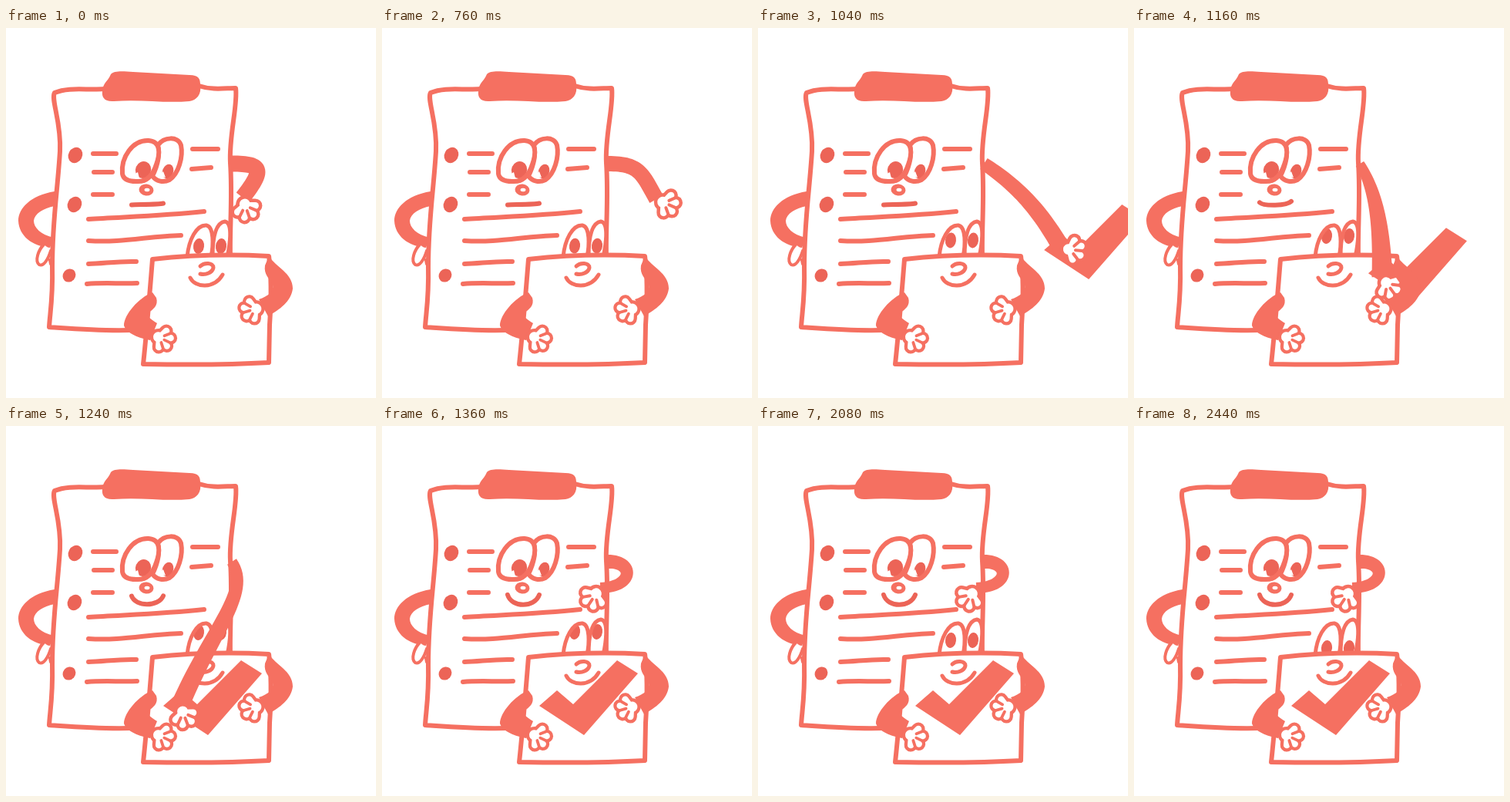
Recreate the animation shown at these times as an HTML page with a canvas. Size 480x480 px, loop 3360 ms.

```html
<!DOCTYPE html>
<html lang="en">
<head>
<meta charset="utf-8">
<title>Clipboard and note</title>
<style>
html, body { margin: 0; width: 100%; height: 100%; overflow: hidden; background: #fff; }
canvas { display: block; width: 100vw; height: 100vh; }
</style>
</head>
<body>
<canvas id="stage" width="480" height="480"></canvas>
<script>
const ctx = document.getElementById('stage').getContext('2d');
const LOOP = 3360, STEP = 40;
const RED = '#f57061', DARK = '#ec6457', WHITE = '#fff';

function line(d, width = 6, color = RED) {
  ctx.lineWidth = width;
  ctx.strokeStyle = color;
  ctx.stroke(new Path2D(d));
}

function fill(d, color = RED) {
  ctx.fillStyle = color;
  ctx.fill(new Path2D(d));
}

function oval(x, y, rx, ry, turn = 0, color = RED) {
  ctx.fillStyle = color;
  ctx.beginPath();
  ctx.ellipse(x, y, rx, ry, turn, 0, Math.PI * 2);
  ctx.fill();
}

// Linear blend between rows of [time, ...values]
function track(keys, t) {
  if (t <= keys[0][0]) return keys[0].slice(1);
  for (let i = 1; i < keys.length; i++) {
    const a = keys[i - 1], b = keys[i];
    if (t <= b[0]) {
      const k = (t - a[0]) / (b[0] - a[0]);
      return a.slice(1).map((v, j) => v + (b[j + 1] - v) * k);
    }
  }
  return keys[keys.length - 1].slice(1);
}

// Hand with four fingers; the wrist is at x, y
function glove(x, y, deg, size = 1) {
  const fan = [-72, -25, 22, 68].map(a => a * Math.PI / 180);
  const reach = [13, 15, 15, 13];
  const shape = grow => {
    ctx.lineWidth = 9 + grow;
    fan.forEach((a, i) => {
      ctx.beginPath();
      ctx.moveTo(11, 0);
      ctx.lineTo(11 + Math.cos(a) * reach[i], Math.sin(a) * reach[i]);
      ctx.stroke();
    });
    ctx.beginPath();
    ctx.arc(9, 0, 7 + grow / 2, 0, Math.PI * 2);
    ctx.fill();
  };
  ctx.save();
  ctx.translate(x, y);
  ctx.rotate(deg * Math.PI / 180);
  ctx.scale(size, size);
  ctx.strokeStyle = ctx.fillStyle = RED;
  shape(9);
  ctx.strokeStyle = ctx.fillStyle = WHITE;
  shape(0);
  ctx.strokeStyle = RED;
  ctx.lineWidth = 4;
  for (let i = 0; i < 3; i++) {
    const a = (fan[i] + fan[i + 1]) / 2;
    ctx.beginPath();
    ctx.moveTo(11 + Math.cos(a) * 7, Math.sin(a) * 7);
    ctx.lineTo(11 + Math.cos(a) * 15, Math.sin(a) * 15);
    ctx.stroke();
  }
  ctx.restore();
}

// Bezier limb whose width goes from w0 to w1
function limb(p, w0, w1) {
  const left = [], right = [];
  for (let i = 0; i <= 30; i++) {
    const s = i / 30, r = 1 - s;
    const at = j => r * r * r * p[j] + 3 * r * r * s * p[j + 2] + 3 * r * s * s * p[j + 4] + s * s * s * p[j + 6];
    const vel = j => r * r * (p[j + 2] - p[j]) + 2 * r * s * (p[j + 4] - p[j + 2]) + s * s * (p[j + 6] - p[j + 4]);
    const dx = vel(0), dy = vel(1), n = (w0 + (w1 - w0) * s) / 2 / (Math.hypot(dx, dy) || 1);
    left.push([at(0) - dy * n, at(1) + dx * n]);
    right.unshift([at(0) + dy * n, at(1) - dx * n]);
  }
  ctx.fillStyle = RED;
  ctx.beginPath();
  left.concat(right).forEach(q => ctx.lineTo(q[0], q[1]));
  ctx.fill();
}

// time, two control points, wrist, root width, wrist width, hand angle
const ARM = [
  [720, 332, 176, 336, 183, 307, 220, 21, 21, 72],
  [760, 334, 176, 337, 188, 356, 222, 20, 20, 25],
  [840, 365, 190, 430, 215, 525, 272, 22, 20, -15],
  [880, 365, 192, 425, 214, 515, 265, 22, 20, -30],
  [920, 350, 192, 402, 204, 466, 249, 22, 19, -40],
  [1160, 314, 212, 321, 255, 322, 323, 12, 27, 55],
  [1240, 318, 215, 270, 260, 226, 362, 14, 24, 70],
  [1280, 327, 175, 328, 209, 283, 210, 18, 14, 105],
  [1360, 327, 175, 328, 209, 283, 210, 18, 14, 125]
];
// time, remaining share of the tick's way in
const TICK = [[880, 1.2], [920, 1], [1000, 0.85], [1160, 0.448], [1240, 0]];
const GRIN = [[1080, 0], [1160, 0.3], [1240, 0.85], [1280, 1]];
const GAZE = [[720, 283], [920, 281], [1160, 270], [1280, 267], [1880, 267],
  [2080, 278], [2240, 285], [2440, 288]];

function clipboard(grin) {
  fill('M63 212C32 217 16 234 16 250C17 270 34 283 57 285L62 272C45 268 36 259 36 250C37 241 48 234 63 231Z');
  fill('M49 281C42 288 36 302 43 307C50 311 57 299 60 289Z', WHITE);
  line('M49 281C42 288 37 302 43 307C49 310 55 299 58 289M57 301L58 306', 4);
  line('M128 79C105 81 82 76 63 84C58 93 72 122 70 160C67 210 60 250 60 310C61 350 57 370 56 388C85 390 120 393 160 392M250 75C268 81 284 78 298 78C301 100 289 140 291 175C294 220 290 260 291 297');
  fill('M125 82C126 70 132 70 136 60C140 55 152 56 165 57L238 61C250 61 252 66 252 74C254 86 247 94 238 95C205 98 175 92 140 95C128 96 124 90 125 82Z');
  oval(90, 165, 9, 10.5, 0.5, DARK);
  oval(89, 229, 9, 10.5, 0.5, DARK);
  oval(82, 321, 8, 9, 0.7, DARK);
  line('M113 163H143M114 187H138M113 216H138M242 157H275M241 183L266 181M107 248C150 245 200 244 257 238M107 276C150 279 185 270 227 269M107 306C125 306 145 302 169 303M105 332C125 330 150 332 170 331');

  const leftEye = 'M151 189C149 168 164 145 185 146C201 147 200 163 195 177C190 193 181 200 169 199C158 199 152 196 151 189Z';
  const rightEye = 'M197 152C205 141 223 140 227 152C230 167 224 189 212 197C204 201 195 199 190 192C196 180 200 165 197 152Z';
  fill(rightEye, WHITE);
  oval(210, 186, 7, 9.5, 0.35, DARK);
  line(rightEye);
  fill(leftEye, WHITE);
  oval(178, 184, 10, 11, 0.4, DARK);
  line(leftEye);
  fill('M164 191L171 187L173 195Z', WHITE);
  fill('M199 191L204 186L207 194Z', WHITE);
  oval(182, 210, 9.5, 7.5, 0.1);
  oval(183, 210, 3.5, 2.2, 0.1, WHITE);

  const end = 229.5 - 10.5 * grin, sag = 229 + 7 * grin;
  line(`M163 ${end}C168 ${sag} 198 ${sag} 204 ${end - 2 + 2 * grin}`, 6, DARK);
}

function note(gaze) {
  const leftEye = 'M235 297C237 275 247 255 260 256C270 258 269 282 266 297Z';
  const rightEye = 'M268 297C268 280 270 253 284 251C295 253 290 283 287 297Z';
  [[rightEye, 279], [leftEye, 250]].forEach(([eye, x]) => {
    fill(eye, WHITE);
    ctx.save();
    ctx.clip(new Path2D(eye));
    oval(x, gaze, 7, 10, 0.12, DARK);
    ctx.restore();
    line(eye, 5);
  });
  const page = 'M190 300C235 295 285 293 341 296C345 325 344 355 342 385L341 434C290 437 235 437 178 436C182 400 186 350 190 300Z';
  fill(page, WHITE);
  line(page);
  line('M252 309C257 304 269 304 269 311C268 317 259 321 252 319', 5);
  line('M239 324C245 337 270 339 281 320', 5);
  fill('M190 343C172 350 153 372 153 386C156 396 174 403 187 405L196 383C187 377 182 374 184 370C191 365 198 360 195 350Z');
  glove(190, 397, 27, 0.95);
}

function noteArm() {
  fill('M341 296C350 310 372 318 372 338C370 355 355 365 340 374L328 352C340 348 348 342 346 333C342 325 334 320 336 308Z');
  glove(333, 362, 165, 0.95);
}

function tick(share) {
  ctx.save();
  ctx.translate(223 * share, -100 * share);
  fill('M204 363L227 343L248 361L305 304L332 321L262 401Z');
  ctx.restore();
}

function draw(t) {
  ctx.fillStyle = WHITE;
  ctx.fillRect(0, 0, 480, 480);
  ctx.lineCap = ctx.lineJoin = 'round';
  const arm = track(ARM, t);
  clipboard(track(GRIN, t)[0]);
  note(track(GAZE, t)[0]);
  if (t >= 880) tick(track(TICK, t)[0]);
  limb([293, 176, ...arm.slice(0, 6)], arm[6], arm[7]);
  glove(arm[4], arm[5], arm[8]);
  noteArm();
}

function frame(now) {
  const t = now % LOOP;
  draw(Math.floor(t / STEP) * STEP);
  requestAnimationFrame(frame);
}
draw(0);
requestAnimationFrame(frame);
</script>
</body>
</html>
```
